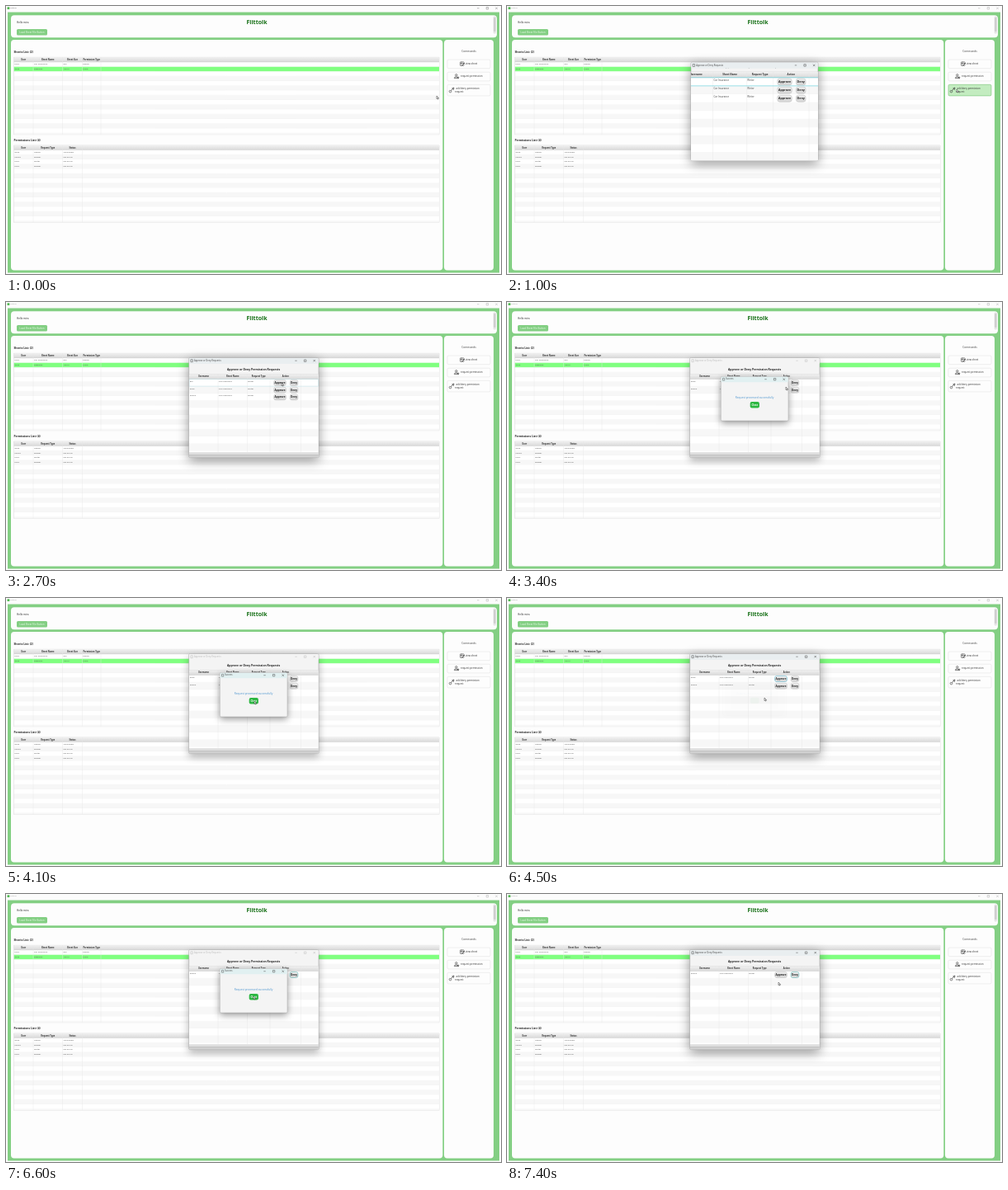
Recreate the animation shown at these times as an HTML page with a canvas. Size 600 px wide and 325 px high, loop 7500 ms.

```html
<!DOCTYPE html>
<html lang="en">
<head>
<meta charset="utf-8">
<style>
html, body { margin: 0; overflow: hidden; background: #fff; }
canvas { display: block; width: 600px; height: 325px; }
</style>
</head>
<body>
<canvas id="stage" width="600" height="325"></canvas>
<script>
const c = document.getElementById('stage').getContext('2d');
const LOOP = 7500, STEP = 100;
const GREEN = '#83cf83';
const SHEETS = [['mira', 'Car Insurance', '8X7', 'Owner'], ['dova', 'beginner', '10X10', 'None']];
const PERMISSIONS = [['dova', 'Owner', 'APPROVED'], ['Kelmo', 'Reader', 'PENDING'],
  ['mira', 'Writer', 'PENDING'], ['mira', 'Reader', 'PENDING']];
const REQUESTS = ['Rin', 'dova', 'Kelmo'];
const POPUPS = [[3100, 4300], [5600, 6700]];
// time, x, y
const PATH = [[0, 522, 109], [300, 522, 109], [700, 545, 101], [1000, 545, 101], [1600, 359, 97],
  [2100, 334, 98], [3100, 334, 98], [3400, 338, 103], [3900, 301, 125], [4300, 301, 125],
  [4500, 312, 121], [5200, 348, 97], [5700, 348, 97], [6300, 300, 124], [6800, 300, 124],
  [7400, 329, 107]];

function rect(x, y, w, h, fill, r = 0, line) {
  c.beginPath();
  c.roundRect(x, y, w, h, r);
  if (fill) { c.fillStyle = fill; c.fill(); }
  if (line) { c.strokeStyle = line; c.lineWidth = .5; c.stroke(); }
}

function text(s, x, y, size = 2.6, color = '#444', bold = false, align = 'left') {
  c.font = `${bold ? 'bold ' : ''}${size}px "Open Sans", sans-serif`;
  c.fillStyle = color;
  c.textAlign = align;
  c.textBaseline = 'middle';
  c.fillText(s, x, y);
}

function path(points, color, width = .5) {
  c.beginPath();
  points.forEach(([x, y]) => c.lineTo(x, y));
  c.strokeStyle = color;
  c.lineWidth = width;
  c.stroke();
}

function ring(x, y, r, color = '#333') {
  c.beginPath();
  c.arc(x, y, r, 0, 7);
  c.strokeStyle = color;
  c.lineWidth = .6;
  c.stroke();
}

function vertical(y, h, top, bottom) {
  const g = c.createLinearGradient(0, y, 0, y + h);
  g.addColorStop(0, top);
  g.addColorStop(1, bottom);
  return g;
}

function controls(x, y, color) {
  path([[x - 1.2, y], [x + 1.2, y]], color);
  rect(x + 9.9, y - 1.2, 2.4, 2.4, null, 0, color);
  path([[x + 21, y - 1.2], [x + 23.4, y + 1.2]], color);
  path([[x + 21, y + 1.2], [x + 23.4, y - 1.2]], color);
}

function grid(x, y, w, h, head, rowH, edges, titles, selected) {
  rect(x, y, w, h, '#fff', 0, '#ccc');
  c.save();
  c.beginPath();
  c.rect(x, y, w, h);
  c.clip();
  for (let i = 0, ry = y + head; ry < y + h; i++, ry += rowH) {
    rect(x, ry, w, rowH, i === selected ? '#80ff80' : i % 2 ? '#f7f7f7' : '#fff');
    path([[x, ry + rowH], [x + w, ry + rowH]], '#ededed', .4);
  }
  rect(x, y, w, head, vertical(y, head, '#f0f0f0', '#d9d9d9'));
  path([[x, y + head], [x + w, y + head]], '#c4c4c4', .4);
  edges.forEach((e, i) => {
    path([[e, y], [e, y + h]], '#e6e6e6', .4);
    if (titles[i]) text(titles[i], ((edges[i - 1] ?? x) + e) / 2, y + head / 2 + .2, 2.55, '#333', true, 'center');
  });
  c.restore();
}

function cells(rows, xs, y, rowH) {
  rows.forEach((row, i) => row.forEach((s, j) => text(s, xs[j], y + i * rowH, 2.5)));
}

function icons() {
  rect(550.5, 67.8, 4.5, 4.6, '#fff', .5, '#333');
  path([[550.5, 69.5], [555, 69.5]], '#333');
  path([[552.2, 67.8], [552.2, 72.4]], '#333');
  path([[553, 72], [556, 69]], '#333', .8);
  ring(545.8, 83.8, 1.2);
  path([[543.4, 87.6], [544, 86], [547, 86], [548.6, 87.6], [543.4, 87.6]], '#333', .6);
  ring(548, 86.6, .8);
  ring(538.5, 103.6, 1.3);
  path([[539.5, 102.6], [542.5, 99.4]], '#333', .7);
  path([[540.3, 100], [543, 99], [542.4, 102]], '#333', .6);
}

function desktop(t, hover) {
  rect(0, 0, 600, 325, '#fcfcfc');
  rect(1.5, 1.2, 2.8, 2.8, '#53b853', .5);
  text('Flittolk', 5.2, 2.8, 2.4, t < 800 ? '#555' : '#999');
  controls(572.3, 2.7, t < 800 ? '#777' : '#aaa');
  rect(2, 7.5, 596, 316, GREEN);

  rect(6, 11.3, 589, 27, '#fdfdfd', 4);
  rect(590.7, 12.5, 3.2, 21, '#e5e5e5', 1);
  rect(591, 14, 2.6, 17, '#cfcfcf', 1);
  text('Hello mira', 13, 20.2, 3, '#222');
  text('Flittolk', 304, 19.8, 7, '#167016', true, 'center');
  rect(13, 28, 37, 7.6, GREEN, 1.5);
  text('Load Sheet File Button', 31.5, 31.8, 2.9, '#eefbee', false, 'center');

  rect(6, 41, 523.3, 279.5, '#fdfdfd', 4);
  rect(531, 41, 60, 279.5, '#fdfdfd', 4);
  text('Sheets List: (2)', 9.5, 56.3, 3.25, '#222', true);
  grid(9.5, 62.3, 515.5, 93.4, 5.6, 5.75, [33, 68.5, 92.5, 115], ['User', 'Sheet Name', 'Sheet Size', 'Permission Type'], 1);
  cells(SHEETS, [10.5, 34, 69.5, 93], 70.8, 5.7);
  text('Permissions List: (4)', 9.5, 163, 3.25, '#222', true);
  grid(9.5, 169, 515.5, 93.4, 5.6, 5.75, [33, 68.5, 92.5], ['User', 'Request Type', 'Status']);
  cells(PERMISSIONS, [10.5, 34, 69.5], 177.4, 5.7);

  text('Commands', 561, 55.3, 3.3, '#444', false, 'center');
  rect(535, 65, 52, 10.7, '#fdfdfd', 1.5, '#ddd');
  rect(535, 80.2, 52, 10.7, '#fdfdfd', 1.5, '#ddd');
  rect(535, 95.3, 52, 13.6, hover ? '#c3ecc0' : '#fdfdfd', 1.5, hover ? '#62b962' : '#ddd');
  text('view sheet', 557, 70.4, 2.95, '#333');
  text('request permission', 551, 85.6, 2.95, '#333');
  text('ack\\deny permission', 545.5, 100, 2.95, '#333');
  text('request', 544, 104.3, 2.95, '#333');
  icons();
}

function button(label, x, y, w, focus) {
  rect(x - w / 2, y - 3.5, w, 7, vertical(y - 3.5, 7, '#eee', '#d4d4d4'), 2.4, focus || '#c2c2c2');
  text(label, x, y + .1, 3.15, '#222', true, 'center');
}

function requests(t) {
  const first = t < POPUPS[0][0] ? 0 : t < POPUPS[1][0] ? 1 : 2;
  text('Approve or Deny Permission Requests', 300, 82.2, 3.4, '#222', true, 'center');
  grid(222, 87.7, 156.7, 94.5, 5.8, 8.7, [257, 292.5, 320, 357.5], ['Username', 'Sheet Name', 'Request Type', 'Action']);
  if (!first) rect(222.2, 93.5, 156.3, 8.7, null, 0, t < 1100 ? '#58d0dc' : '#bcdde2');
  REQUESTS.slice(first).forEach((user, i) => {
    const y = 96.4 + i * 8.7;
    cells([[user, 'Car Insurance', 'Writer']], [222.8, 257.8, 293], y, 0);
    button('Approve', 332, y + 1.6, 15, !i && first === 1 && '#4fb3cf');
    button('Deny', 349, y + 1.6, 10, !i && first === 2 && '#4fb3b0');
  });
}

function dialog(t, active) {
  const opening = t < 1100;
  const [x, y, w, h] = opening ? [223, 68.3, 154, 119] : [221.7, 67.6, 157.3, 121];
  c.save();
  c.globalAlpha = t < 900 ? .3 : 1;
  c.shadowColor = `rgba(0,0,0,${active ? .42 : .3})`;
  c.shadowBlur = active ? 14 : 10;
  c.shadowOffsetY = 4;
  rect(x, y, w, h, '#f4f4f4', 1.5);
  c.shadowColor = 'transparent';
  rect(x, y, w, h, null, 1.5, '#999');
  c.save();
  c.clip();
  if (opening) c.transform(1.16, 0, 0, 1.16, -48.6, -21.7);
  requests(t);
  if (!opening) {
    rect(222, 182.2, 156.7, 6, '#e0e0e0');
    rect(222, 184.7, 156.7, 2.8, '#c9c9c9');
  }
  c.restore();
  const ink = active ? '#444' : '#bbb';
  rect(x + .3, y + .3, w - .6, 7.2, active ? '#e9eef0' : '#f4f4f4', 1);
  rect(x + 2.2, y + 2.2, 2.4, 2.9, null, 0, ink);
  text('Approve or Deny Requests', x + 6.3, y + 3.8, 2.65, ink);
  controls(opening ? 350 : 351.5, y + 3.6, ink);
  c.restore();
}

function popup(alpha, scale) {
  c.save();
  c.globalAlpha = alpha;
  c.translate(300, 117);
  c.scale(scale, scale);
  c.translate(-300, -117);
  c.shadowColor = 'rgba(0,0,0,.4)';
  c.shadowBlur = 9;
  c.shadowOffsetY = 3;
  rect(259.3, 90.4, 81.7, 53.6, '#f4f4f4', 1.5);
  c.shadowColor = 'transparent';
  rect(259.3, 90.4, 81.7, 53.6, null, 1.5, '#aaa');
  rect(259.6, 90.7, 81.1, 6.5, '#e1f0f1', 1);
  rect(261.5, 92.3, 2.2, 2.8, null, 0, '#555');
  text('Success', 265, 93.8, 2.6);
  controls(313.5, 93.7, '#444');
  text('Request processed successfully', 300, 115.7, 3.2, '#4a94cf', false, 'center');
  rect(294.7, 121, 11.2, 7.6, '#2db742', 2);
  text('Close', 300.3, 124.8, 2.9, '#fff', true, 'center');
  c.restore();
}

function cursor(t) {
  const i = Math.max(1, PATH.findIndex(p => p[0] >= t));
  const [t0, x0, y0] = PATH[i - 1], [t1, x1, y1] = PATH[i];
  const k = (t - t0) / (t1 - t0), e = k * k * (3 - 2 * k);
  const x = x0 + (x1 - x0) * e, y = y0 + (y1 - y0) * e;
  c.beginPath();
  [[0, 0], [0, 3.6], [.9, 2.8], [1.5, 4.1], [2.1, 3.8], [1.5, 2.6], [2.6, 2.6]]
    .forEach(([dx, dy]) => c.lineTo(x + dx, y + dy));
  c.closePath();
  c.fillStyle = '#fff';
  c.fill();
  c.strokeStyle = '#333';
  c.lineWidth = .5;
  c.stroke();
}

function draw(t) {
  c.clearRect(0, 0, 600, 325);
  desktop(t, t >= 600 && t < 1200);
  const active = !POPUPS.some(([open, close]) => t >= open && t < close);
  if (t >= 800) dialog(t, active);
  for (const [open, close] of POPUPS) {
    if (t > open && t < close) popup(t < open + 200 ? .4 : 1, t < open + 200 ? .92 : 1);
    else if (t >= close && t < close + 300) popup([.4, .12, .03][(t - close) / STEP], .94);
  }
  cursor(t);
}

function tick() {
  draw(Math.floor(performance.now() % LOOP / STEP) * STEP);
  requestAnimationFrame(tick);
}
tick();
</script>
</body>
</html>
```
